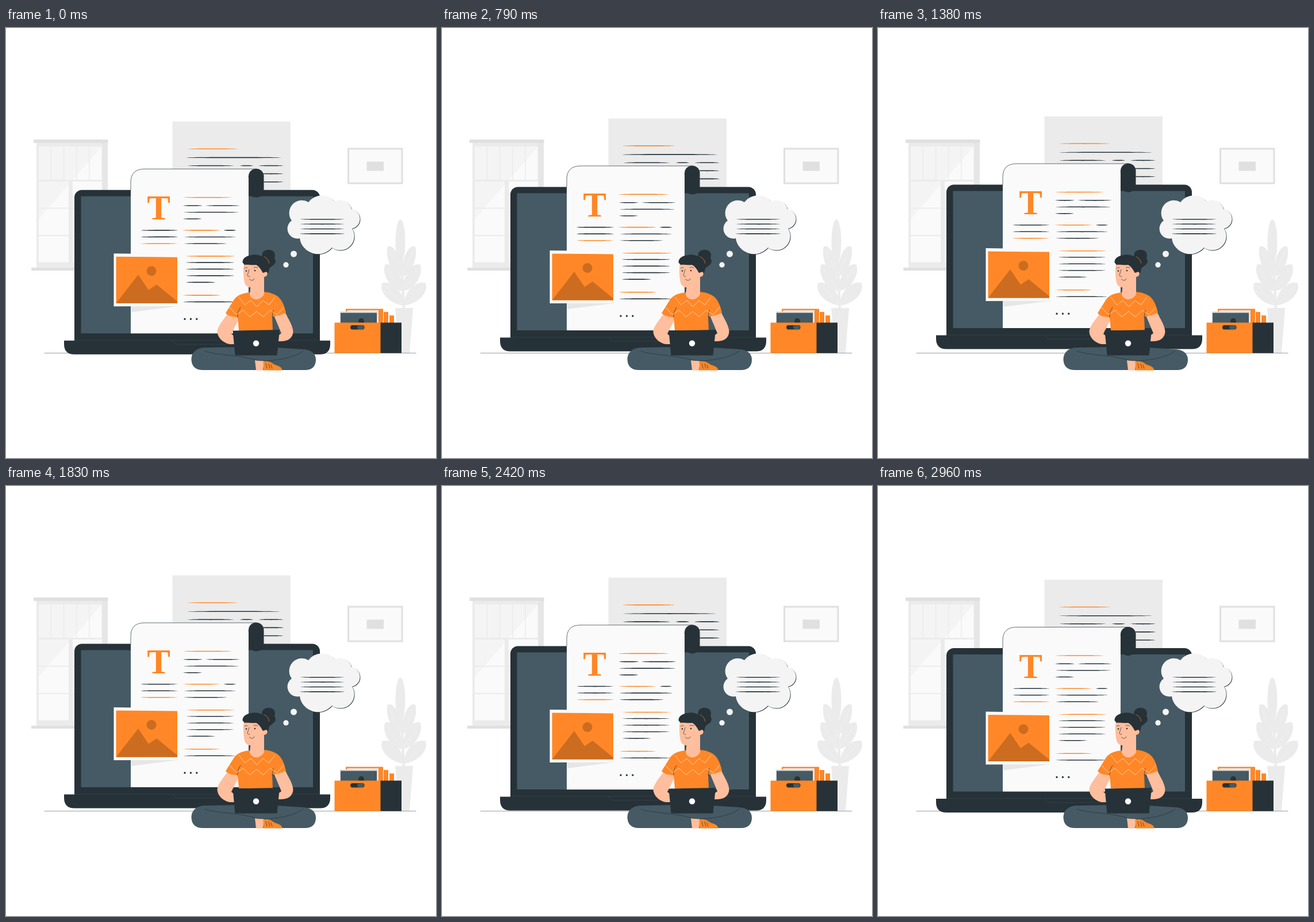
An HTML page that plays this animation: 748 px wide and 748 px high, repeating every 3000 ms.

```html
<!DOCTYPE html>
<html lang="en">
<head>
<meta charset="utf-8">
<title>Writing at a laptop</title>
<style>
  html, body { margin: 0; width: 100%; height: 100%; overflow: hidden; background: #fff; }
  svg { display: block; width: 100%; height: 100%; }
  .dark { fill: #263238; }
  .slate { fill: #455a64; }
  .orange { fill: #ff8727; }
  .brown { fill: #cc6c20; }
  .skin { fill: #ffbe9d; }
  .pale { fill: #fafafa; }
  .light { fill: #f4f4f4; }
  .grey { fill: #ebebeb; }
  .mid { fill: #e0e0e0; }
  .thin { fill: none; stroke: #263238; stroke-width: .7; stroke-linecap: round; stroke-linejoin: round; }
  .vein { fill: none; stroke: #fafafa; stroke-width: .6; opacity: .6; }
  .zigzag { fill: none; stroke: #ffe0c6; stroke-width: .8; }
</style>
</head>
<body>
<svg viewBox="0 0 748 748">
  <!-- window -->
  <rect class="grey" x="53" y="200" width="124" height="217"/>
  <rect fill="#e6e6e6" x="167" y="200" width="10" height="217"/>
  <rect class="mid" x="48" y="194" width="129.500" height="6"/>
  <rect class="mid" x="44" y="417" width="134" height="5"/>
  <clipPath id="panes"></clipPath>
  <g clip-path="url(#panes)">
    <rect class="light" x="57" y="206" width="110" height="202"/>
    <path class="pale" d="M167 206V408H57V332Z"/>
  </g>

  <!-- wall picture -->
  <rect class="pale" x="595.500" y="210" width="93.500" height="60" stroke="#e0e0e0" stroke-width="3"/>
  <rect class="mid" x="627.500" y="232.500" width="29.500" height="16"/>

  <!-- plant -->
  <g class="grey" id="plant">
    <ellipse cx="686" cy="372" rx="8.500" ry="39"/>
    <path d="M684 390H690L694 488H690Z"/>
    <path d="M677 487H708L702 565H684Z"/>
  </g>

  <path class="thin" opacity=".65" d="M67 565.500H713"/>

  <!-- file box -->
  <g class="orange">
    <rect x="591" y="488.500" width="65" height="25"/>
    <rect x="657" y="494" width="8" height="19"/>
    <rect x="667" y="500" width="8" height="13"/>
  </g>
  <rect class="grey" x="593" y="491" width="55" height="22"/>
  <rect class="mid" x="580.500" y="493" width="66.500" height="20"/>
  <rect class="slate" x="582" y="495.500" width="63" height="18"/>
  <circle class="dark" cx="618" cy="510" r="5"/>
  <rect class="orange" x="571.500" y="512.500" width="80.500" height="53"/>
  <rect class="dark" x="651.500" y="512.500" width="36.500" height="53"/>
  <rect class="dark" x="599" y="517" width="24.500" height="7.500" rx="3.700"/>
  <rect class="slate" x="611" y="517.600" width="11.500" height="6.300" rx="3.100"/>

  <!-- floating laptop and pages -->
  <g id="float">
    <rect class="grey" x="289.500" y="163" width="205.500" height="127"/>
    <g id="backText"></g>
    <rect class="dark" x="119" y="282" width="427" height="275" rx="13"/>
    <rect class="slate" x="130.500" y="293" width="403.500" height="238.500"/>
    <path class="dark" d="M101 544H564V550Q564 568 546 568H119Q101 568 101 550Z"/>
    <path class="thin" style="stroke:#455a64" opacity=".5" d="M119 543.500H546M291 544Q293 550.500 299 550.500H400"/>
    <rect class="dark" x="422" y="245" width="26.500" height="50" rx="13"/>
    <path class="pale" d="M217 531.500V269Q217 245.500 241 245.500H435Q422 246 422 260V531.500Z"/>
    <path class="thin" d="M217 282V269Q217 245.500 241 245.500H435Q422 246 422 260"/>
    <text class="orange" x="265.500" y="333.500" font-family="'Liberation Serif', serif" font-weight="700" font-size="61" text-anchor="middle">T</text>
    <g id="pageText"></g>
    <path class="thin" style="stroke-width:3.400" stroke-dasharray="0 10.400" d="M311 506.500H333"/>
    <path fill="#e6e6e6" d="M217 484H301L218 494.500Z"/>
    <path class="pale" d="M187.500 392.500L301.500 394V484L187.500 484.500Z"/>
    <path class="orange" d="M191.500 398L298 399V479H191.500Z"/>
    <circle class="brown" cx="253" cy="423" r="8.500"/>
    <path class="brown" d="M191.500 479L230 429.500L248 456L262 446.500L298 476V479Z"/>
  </g>

  <!-- thought -->
  <path id="cloud" transform="translate(.8 .8)" class="dark" d="M497 335A22 22 0 0 1 526 303A29 29 0 0 1 572 302A20 20 0 0 1 601 315A17.300 17.300 0 0 1 602 349A24.500 24.500 0 0 1 567 382A32 32 0 0 1 511 366A17.300 17.300 0 0 1 497 335"/>
  <g class="light" id="thought">
    <circle cx="500.500" cy="393" r="5.500"/>
    <circle cx="487" cy="412" r="4.700"/>
  </g>
  <g id="cloudText"></g>

  <!-- writer -->
  <path class="slate" d="M344 556C330 557 322 566 322.500 577C323 589 330 595 343 595H520C533 595 539 588 539 577C539 566 531 560 518 559L472 556L399 555Z"/>
  <path class="skin" d="M433 578L449 579L447 595.500H435Z"/>
  <path class="orange" d="M447.500 580C456 578 462 582 468 586C475 588 480 590 480.500 595.500H448Z"/>
  <path class="thin" d="M452 584L454 592M457 584L459 592M461 586L463 592"/>
  <path class="thin" d="M346 562C362 569 404 568 436 578L449 579C474 578 500 574 517 562"/>

  <path class="skin" d="M388 493C380 506 368 518 367.500 528C368 540 380 549 390 550H401L398 537L392 532L407 502Z"/>
  <path class="skin" d="M466 500L485 493C490 505 499 517 499.500 528C499 540 490 546 473 545L472 536L479 531Z"/>
  <path class="orange" d="M424 460C412 461 403 464 397 472L382 496C387 501 395 503 403 503L405 526H464L463 502C472 501 480 499 487 495C484 482 479 470 470 465C463 461 455 459 448 459Z"/>
  <path class="thin" d="M403 503C402 496 405 491 408 486M463 503L465 491"/>
  <path class="zigzag" id="zigzags"/>

  <path class="skin" d="M426 446L424 464C428 475 443 475 449 463V432Z"/>
  <path class="thin" d="M423 451V459"/>
  <path class="dark" d="M446 399C443 390 451 385 458 386C466 386 470 393 467 400C470 405 469 408 467 411L458 418C457 424 456 428 453 430L446 428Z"/>
  <path class="skin" d="M414 407C412 424 413 437 416 446C420 453 431 453 440 447L447 433C454 434 457 427 453 424C450 421 447 425 446 425L444 408Z"/>
  <path class="dark" d="M411.500 408C411 400 419 396 429 394.500C442 393 455 400 457 411L453 424L447 426C444 421 441 415 435 412C428 413 420 411 415 412Z"/>
  <path class="thin" style="stroke:#ff8727" d="M449 398C454 400 457 404 457.500 409"/>
  <path class="thin" d="M423 420L420 430Q421 433 424 432M423.500 437Q429 442 432 436M431 417Q434 415 438 417M415 418Q417 416 420 417"/>
  <circle class="dark" cx="418" cy="422.500" r="1.300"/>
  <circle class="dark" cx="433" cy="422" r="1.300"/>

  <path class="dark" d="M394.500 526.500L476 525L471.500 569.500H398.500Z"/>
  <circle fill="#fff" cx="435" cy="548.500" r="5.200"/>
</svg>
<script>
const byId = id => document.getElementById(id);
const add = (id, markup) => byId(id).insertAdjacentHTML('beforeend', markup);

// Window: five narrow panes on top, three rows of two below
const pane = (x, y, w, h) => add('panes', `<rect x="${x}" y="${y}" width="${w}" height="${h}"/>`);
for (let i = 0; i < 5; i++) pane(57 + 22.2 * i, 206, 20.5, 58);
for (let row = 0; row < 3; row++) {
  pane(57, 267 + 47.5 * row, 52, 45.5);
  pane(116, 267 + 47.5 * row, 51, 45.5);
}

// Plant: three pairs of leaves that widen downwards
for (let i = 0; i < 3; i++)
  for (const side of [-1, 1]) {
    const x = 688 + 2 * i, y = 433 + 25 * i;
    const dx = side * (24 + 6.5 * i), dy = -53 + 6.5 * i;
    const at = (u, v) => `${x + dx * u} ${y + dy * v}`;
    add('plant', `<path d="M${at(0, 0)}C${at(.8, .1)} ${at(1.2, .7)} ${at(1, 1)}C${at(.5, 1.08)} ${at(0, .6)} ${at(0, 0)}"/>
      <path class="vein" d="M${at(0, 0)}L${at(.85, .85)}"/>`);
  }

byId('thought').prepend(byId('cloud').cloneNode());
const face = byId('thought').firstChild;
face.removeAttribute('transform');
face.setAttribute('class', 'light');

// One line of writing with tapered ends
function stroke(id, kind, x, y, w) {
  const t = w * .1;
  add(id, `<path class="${kind}" d="M${x} ${y}c${t} -1.1 ${w - t} -1.1 ${w} 0c${-t} 1.1 ${t - w} 1.1 ${-w} 0"/>`);
}
// Helpers for one sheet: orange headings and dark paragraphs
const sheet = (id, pitch) => ({
  head: (x, y, w) => stroke(id, 'orange', x, y, w),
  para(x, y, w, rows = 1, last = w) {
    for (let i = 0; i < rows; i++) stroke(id, 'dark', x, y + pitch * i, i < rows - 1 ? w : last);
  }
});

const back = sheet('backText', 14.1);
back.head(314, 210.5, 91);
back.para(313, 225.7, 166);
back.para(315, 239.8, 82);
back.para(407, 239.8, 23);
back.para(439, 239.8, 44, 3);

const page = sheet('pageText', 11.5);
page.head(307, 295, 87);
page.para(308, 309.3, 34);
page.para(347, 309.3, 60);
page.para(308, 320.8, 98, 2, 33);
page.para(234, 352.2, 65, 2);
page.head(234, 375.3, 65);
page.head(307, 352.2, 66);
page.para(379, 352.2, 21);
page.para(309, 363.8, 92, 2, 76);
page.head(313, 397.2, 86);
page.para(313, 408.2, 84, 4, 51);
page.head(308, 465.2, 65);
page.para(308, 476.7, 92);

sheet('cloudText', 8.4).para(511, 332.7, 78, 4);

// Zigzag that sags towards its middle
function zigzag(x, y, w, teeth) {
  let d = '';
  for (let i = 0; i <= teeth; i++)
    d += `${i ? 'L' : 'M'}${x + w * i / teeth} ${y + 7 * Math.sin(Math.PI * i / teeth) + (i % 2 ? 10 : 0)}`;
  return d;
}
byId('zigzags').setAttribute('d', zigzag(405, 468, 63, 6) + zigzag(389, 486, 94, 8));

// The laptop rises and sinks linearly, at 24 steps a second
const STEPS = 72, STEP = 1000 / 24, RISE = 10;
const start = performance.now();

function draw(now) {
  const step = Math.floor(Math.max(0, now - start) / STEP + .1) + 1;
  const p = step % STEPS / STEPS;
  byId('float').setAttribute('transform', `translate(0 ${RISE * (Math.abs(2 * p - 1) - 1)})`);
  requestAnimationFrame(draw);
}
draw(start);
</script>
</body>
</html>
```
